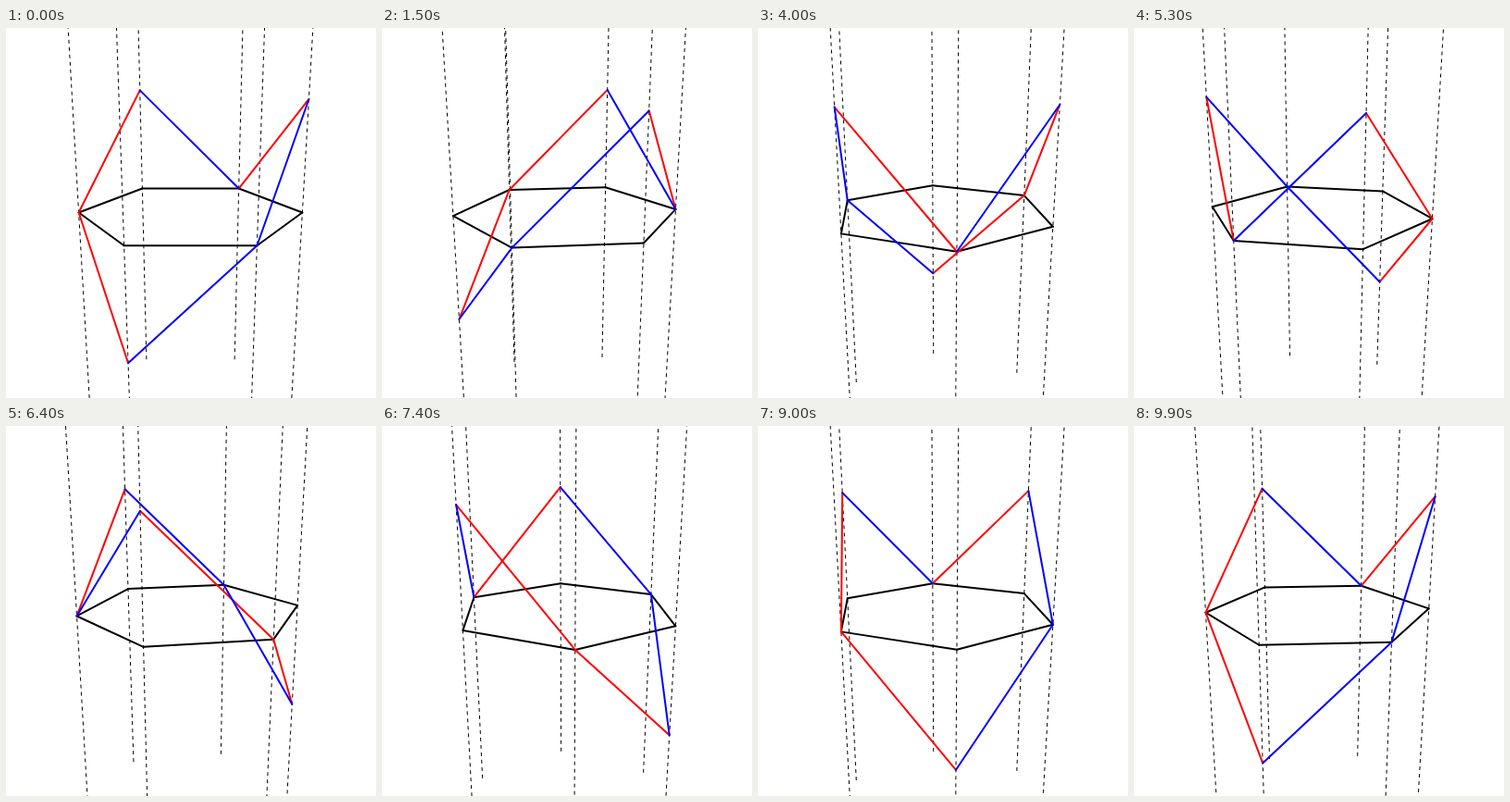
Write an HTML page with a canvas that moves like this. It is 400 by 400 pixels and loops after 10000 ms.

```html
<!DOCTYPE html>
<html lang="en">
<head>
<meta charset="utf-8">
<title>Rotating ring</title>
<style>
html, body { margin: 0; width: 100%; height: 100%; overflow: hidden; background: #fff; }
canvas { display: block; }
</style>
</head>
<body>
<canvas id="stage" width="400" height="400"></canvas>
<script>
const ctx = document.getElementById('stage').getContext('2d');
const STEP = 100, STEPS = 100, CENTER = 199.5;
const FOCAL = 631, CAM_BACK = 5, CAM_UP = 1.5;
const DIST = Math.hypot(CAM_BACK, CAM_UP);
const SIN = CAM_UP / DIST, COS = CAM_BACK / DIST;
const HEIGHTS = [0, 1, 0, 1, 0, -1];
const RED_EDGES = [0, 2, 5], BLUE_EDGES = [1, 3, 4];

// Perspective view of a point on the unit cylinder, camera aimed at its centre
function project(angle, height) {
  const x = Math.cos(angle), z = Math.sin(angle);
  const scale = FOCAL / (DIST + z * COS - height * SIN);
  return [CENTER + x * scale, CENTER - (height * COS + z * SIN) * scale];
}

function line(a, b, color, width, dash = []) {
  ctx.strokeStyle = color;
  ctx.lineWidth = width;
  ctx.lineCap = dash.length ? 'butt' : 'round';
  ctx.setLineDash(dash);
  ctx.beginPath();
  ctx.moveTo(...a);
  ctx.lineTo(...b);
  ctx.stroke();
}

function draw() {
  const step = Math.floor(performance.now() / STEP) % STEPS;
  const turn = step / STEPS * 2 * Math.PI;
  const angles = HEIGHTS.map((_, i) => Math.PI - i * Math.PI / 3 - turn);
  const ring = angles.map(a => project(a, 0));
  const zigzag = angles.map((a, i) => project(a, HEIGHTS[i]));
  const edge = (loop, i, color) => line(loop[i], loop[(i + 1) % 6], color, 2);

  ctx.fillStyle = '#fff';
  ctx.fillRect(0, 0, 400, 400);
  angles.forEach(a => line(project(a, -2), project(a, 2), '#000', 1, [4, 4]));
  ring.forEach((_, i) => edge(ring, i, '#000'));
  RED_EDGES.forEach(i => edge(zigzag, i, '#f00'));
  BLUE_EDGES.forEach(i => edge(zigzag, i, '#00f'));
  requestAnimationFrame(draw);
}
draw();
</script>
</body>
</html>
```
